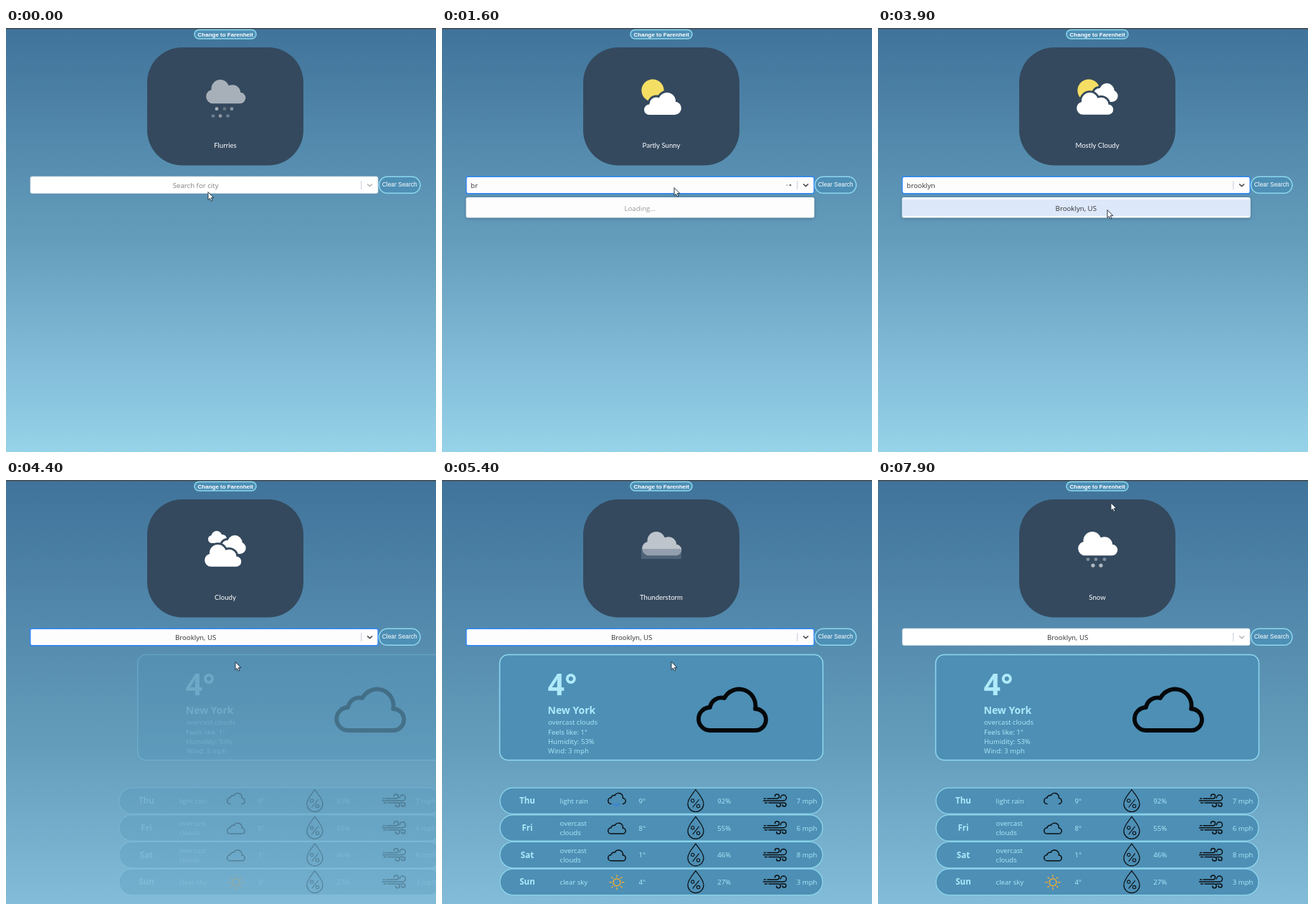
An HTML page with a canvas that plays this animation: 600 by 591 pixels, repeating every 8 s.

```html
<!DOCTYPE html>
<html lang="en">
<head>
<meta charset="utf-8">
<title>Weather search</title>
<style>
html, body { margin: 0; width: 100%; height: 100%; overflow: hidden; background: #659fbc; }
canvas { display: block; width: 600px; height: 591px; }
</style>
</head>
<body>
<canvas id="stage" width="600" height="591"></canvas>
<script>
const ctx = document.getElementById('stage').getContext('2d');
const LOOP = 8000;
const SANS = '"Open Sans", "Noto Sans", sans-serif';
const ARIAL = '"Liberation Sans", Arial, sans-serif';
const LABEL = 'Lato, "Open Sans", sans-serif';
const CARD = '#34495e', PANEL = '#4d8fb5', EDGE = '#8fd8ee', PALE = '#aeeafa';

// Moments of the interaction, in ms
const FOCUS = 980, TYPE = 1420, KEY = 110, FOUND = 3680, PICK = 4300, BLUR = 7150;
const QUERY = 'brooklyn', CITY = 'Brooklyn, US';

const clamp = v => Math.max(0, Math.min(1, v));
const smooth = v => v * v * (3 - 2 * v);

function text(s, x, y, color, font, align = 'left') {
  ctx.font = font;
  ctx.fillStyle = color;
  ctx.textAlign = align;
  ctx.fillText(s, x, y);
}

function box(x, y, w, h, r, fill, edge, line = 1.5) {
  ctx.beginPath();
  ctx.roundRect(x, y, w, h, r);
  ctx.fillStyle = fill;
  ctx.fill();
  if (edge) {
    ctx.strokeStyle = edge;
    ctx.lineWidth = line;
    ctx.stroke();
  }
}

function dot(x, y, r, fill) {
  ctx.beginPath();
  ctx.arc(x, y, r, 0, Math.PI * 2);
  ctx.fillStyle = fill;
  ctx.fill();
}

function stroke(path, color, width) {
  ctx.strokeStyle = color;
  ctx.lineWidth = width;
  ctx.stroke(path);
}

// Runs fn with its own transform and opacity
function group(x, y, scale, alpha, fn) {
  ctx.save();
  ctx.translate(x, y);
  ctx.scale(scale, scale);
  ctx.globalAlpha *= alpha;
  fn();
  ctx.restore();
}

// ---- Summary card ----
const CLOUD = [[289, 95.5, 9.8], [299, 84.5, 12.5], [316, 90.5, 11.2], [326.5, 97.5, 7.8]];
const LOW = [[289.2, 113.8, 7.2], [299, 106, 9.5], [314, 102, 12], [324.7, 111.8, 9.2]];
const BACK = [[309, 92, 8], [319.3, 87.5, 10.4], [326.5, 94.7, 8.2]];
const SMALL = [[287.5, 82.5, 5.5], [294, 78.5, 7.5], [302, 82, 6]];

function cloud(lobes, gap) {
  const first = lobes[0], last = lobes[lobes.length - 1];
  const path = new Path2D();
  for (const [x, y, r] of lobes) {
    path.moveTo(x + r, y);
    path.arc(x, y, r, 0, Math.PI * 2);
  }
  const top = Math.max(first[1], last[1]) - 4;
  path.rect(first[0], top, last[0] - first[0], last[1] + last[2] - top);
  if (gap) stroke(path, CARD, 6);
  ctx.fillStyle = '#fff';
  ctx.fill(path);
}

const frontCloud = () =>
  group(277 - 279 * .927, 90 - 72 * .927, .927, 1, () => cloud(CLOUD, true));

function sun(x, y) {
  dot(x, y, 15.6, '#f5de64');
}

function flakes(xs, y, r, alphas) {
  xs.forEach((x, i) => dot(x, y, r, `rgba(255,255,255,${alphas[i]})`));
}

function snowfall(t) {
  const drop = (xs, shift) => {
    const p = (t / 1100 + shift) % 1;
    const a = Math.sin(Math.PI * p) ** 2;
    flakes(xs, 107 + 17 * p, 1.4 + 1.6 * Math.sin(Math.PI * p), xs.map(() => a));
  };
  drop([300, 311], .53);
  drop([293, 304, 316], .03);
}

const scenes = [
  ['Flurries', () => {
    cloud(CLOUD);
    flakes([294, 305, 315], 112.7, 2.4, [1, .4, .75]);
    flakes([289, 299, 309.5], 122.6, 2.4, [.5, .8, .5]);
  }],
  ['Sunny', () => sun(306, 95.5)],
  ['Partly Sunny', () => { sun(294, 87); cloud(LOW, true); }],
  ['Mostly Cloudy', () => { sun(294, 87); cloud(BACK, true); frontCloud(); }],
  ['Cloudy', () => { cloud(SMALL); cloud(BACK, true); frontCloud(); }],
  ['Thunderstorm', (t, a) => {
    cloud(CLOUD);
    if (a < 1) {
      ctx.fillStyle = 'rgba(105,126,147,.75)';
      ctx.fillRect(278, 96, 56, 14);
    }
  }],
  ['Snow', t => { cloud(CLOUD); snowfall(t); }]
];
const SWITCH = 120, SPAN = 1305, FADE = 90;

function summary(t) {
  box(197, 27, 218, 164.5, 49, CARD);
  const i = Math.min(6, Math.max(0, Math.floor((t - SWITCH) / SPAN) + 1));
  const start = SWITCH + (i - 1) * SPAN, end = start + SPAN;
  let alpha = i ? clamp((t - start) / FADE) : 1;
  if (i < 6) alpha *= clamp((end - t) / (i ? FADE : 210));
  const [name, draw] = scenes[i];
  group(0, 0, 1, alpha, () => draw(t, alpha));
  text(name, 306, 166.8, '#fff', '9.6px ' + LABEL, 'center');
}

// ---- Search bar ----
function loadingDots(t) {
  const base = t < TYPE ? t - 370 : t - 1790;
  for (let i = 0; i < 3; i++) {
    const p = (((base - i * 160) / 1000) % 1 + 1) % 1;
    const a = p < .4 ? smooth(p / .4) : p < .8 ? 1 - smooth((p - .4) / .4) : 0;
    dot(476.8 + i * 4.6, 219, 1.35, `rgba(85,85,85,${a})`);
  }
}

function menu(found) {
  ctx.save();
  ctx.shadowColor = 'rgba(0,0,0,.25)';
  ctx.shadowBlur = 4;
  ctx.shadowOffsetY = 1;
  box(33.5, 236, 486, 28.5, 2.5, '#fdfdfe');
  ctx.restore();
  if (found) {
    ctx.fillStyle = '#dde8fa';
    ctx.fillRect(34, 239, 485.5, 23);
    text(CITY, 276.3, 254.6, '#333', '9.7px ' + SANS, 'center');
  } else {
    text('Loading...', 276.3, 254.6, '#999', '9.7px ' + SANS, 'center');
  }
}

function search(t) {
  const focus = t >= FOCUS && t < BLUR;
  const open = t >= FOCUS && t < PICK;
  const found = t >= FOUND;
  const typed = t >= TYPE ? QUERY.slice(0, Math.floor((t - TYPE) / KEY) + 1) : '';
  const font = '9.7px ' + SANS;

  if (focus) box(33.8, 207.2, 485.4, 23.6, 2.5, '#fefdfe', '#2f86f5');
  else box(34, 207, 485, 23.5, 2.5, '#fff', '#d5dde3', .6);

  if (t >= PICK) {
    text(CITY, 264.6, 222.6, '#333', font, 'center');
  } else if (typed) {
    text(typed, 40, 222.6, '#333', font);
  } else {
    text('Search for city', open ? 252 : 264.6, 222.6, '#808080', font, 'center');
  }
  if (open && !found) loadingDots(t);
  if (open && !typed && (t - FOCUS) % 1060 < 530) {
    ctx.fillStyle = '#333';
    ctx.fillRect(40.3, 212.5, 1, 12.5);
  }

  ctx.fillStyle = '#c4cbd8';
  ctx.fillRect(495.3, 213, 1, 12);
  ctx.lineCap = ctx.lineJoin = 'round';
  stroke(new Path2D('M504.6 217.8 l3 2.9 l3 -2.9'), focus ? '#555' : '#bbb', 1.6);

  if (open) menu(found);
  box(520.5, 207.3, 57.5, 23, 11.5, PANEL, EDGE);
  text('Clear Search', 549.2, 221.4, '#fff', '500 8.4px ' + ARIAL, 'center');
}

// ---- Results ----
const outline = 'M374 349 a16 16 0 0 1 0 -32 a16 16 0 0 1 20 -13 a23 23 0 0 1 43 15 a15 15 0 0 1 0 30';
const closedCloud = new Path2D(outline + 'z');
const openCloud = new Path2D(outline);
const dropShape = new Path2D('M0 -15.5 C-4 -9.5 -11 -3 -11 4.5 A11 11 0 0 0 11 4.5 C11 -3 4 -9.5 0 -15.5z');
const percent = new Path2D('M4.5 -1.5 L-4 9 M-2 0 a2.2 2.2 0 1 1 -4.4 0 a2.2 2.2 0 1 1 4.4 0 M5.8 7.5 a2.2 2.2 0 1 1 -4.4 0 a2.2 2.2 0 1 1 4.4 0');
const breeze = new Path2D('M-15 -3 h2 M-10.5 -3 H3 a3 3 0 1 0 -3 -3 M-16 0 H12 a4 4 0 1 0 -4 -4 M-14 3 h3 M-8.5 3 H5 a2.8 2.8 0 1 1 -2.8 2.8 M8 3 h5 a2.5 2.5 0 1 1 -2.5 2.5');

const days = [
  ['Thu', ['light rain'], 9, 92, 7, 'rain'],
  ['Fri', ['overcast', 'clouds'], 8, 55, 6, 'cloud'],
  ['Sat', ['overcast', 'clouds'], 1, 46, 8, 'cloud'],
  ['Sun', ['clear sky'], 4, 27, 3, 'sun']
];

function dayIcon(kind, y, t) {
  if (kind === 'sun') {
    ctx.strokeStyle = '#f0ad32';
    ctx.lineWidth = 1.4;
    ctx.beginPath();
    ctx.arc(244, y, 5, 0, Math.PI * 2);
    for (let i = 0; i < 8; i++) {
      const c = Math.cos(i * Math.PI / 4), s = Math.sin(i * Math.PI / 4);
      ctx.moveTo(244 + 7.7 * c, y + 7.7 * s);
      ctx.lineTo(244 + 10 * c, y + 10 * s);
    }
    ctx.stroke();
    return;
  }
  const rain = kind === 'rain';
  group(244, rain ? y - 4 : y, .26, 1, () => {
    ctx.translate(-405, -319);
    stroke(rain ? openCloud : closedCloud, '#0b0f12', 5.8);
  });
  if (rain && t > 4700 && t < 6400) {
    for (let i = -1; i < 2; i++) dot(243.5 + i * 3, y + 4.5 + (i ? 0 : 1.5), 1.8, '#3c86d2');
  }
}

function dayRow([name, sky, temp, wet, wind, kind], i, t) {
  const y = 447.3 + i * 37.7, base = y + 3.6, font = '9.6px ' + SANS;
  box(81, y - 18.2, 450, 36.3, 18, PANEL, EDGE, 1.2);
  text(name, 119, y + 4, PALE, 'bold 11.6px ' + SANS, 'center');
  sky.forEach((s, n) => text(s, 164.6, base + (n - (sky.length - 1) / 2) * 13.2, PALE, font));
  dayIcon(kind, y + .3, t);
  text(temp + '°', 274.6, base, PALE, font);
  group(354, y - .3, 1, 1, () => {
    stroke(dropShape, '#0b0f12', 1.2);
    stroke(percent, '#0b0f12', 1.1);
  });
  text(wet + '%', 384.3, base, PALE, font);
  group(464.5, y - .3, 1, 1, () => stroke(breeze, '#0b0f12', 1.5));
  text(wind + ' mph', 494.8, base, PALE, font);
}

function results(t) {
  const p = clamp((t - PICK) / 700), e = 1 - (1 - p) * (1 - p);
  ctx.lineCap = ctx.lineJoin = 'round';
  group(141 * (1 - e), 0, 1, e, () => {
    box(80.5, 243.5, 451, 147, 12, PANEL, EDGE);
    text('4°', 147.5, 300, PALE, 'bold 41px ' + SANS);
    text('New York', 147.5, 326.3, PALE, 'bold 14px ' + SANS);
    ['overcast clouds', 'Feels like: 1°', 'Humidity: 53%', 'Wind: 3 mph'].forEach((s, i) =>
      text(s, 148, 341.2 + i * 13.4, PALE, '9.6px ' + SANS));
    stroke(closedCloud, '#05080a', 5.8);
  });
  group(105 * (1 - e), 0, 1, e, () => days.forEach((d, i) => dayRow(d, i, t)));
}

// ---- Pointer ----
const arrow = new Path2D('M0 0 V10.6 L2.4 8.4 L4.2 12.2 L6 11.4 L4.3 7.7 H7.6z');
const stops = [[0, 282, 229], [150, 282, 229], [850, 324, 223], [3620, 324, 223],
  [3840, 320, 254], [6500, 320, 253.5], [7100, 325, 32], [LOOP, 325, 32]];

function pointer(t) {
  const i = stops.findIndex(s => s[0] > t);
  const [t0, x0, y0] = stops[i - 1], [t1, x1, y1] = stops[i];
  const k = smooth((t - t0) / (t1 - t0));
  group(x0 + (x1 - x0) * k, y0 + (y1 - y0) * k, 1, 1, () => {
    ctx.lineJoin = 'round';
    ctx.fillStyle = '#fff';
    ctx.fill(arrow);
    stroke(arrow, '#263440', 1);
  });
}

function page(t) {
  const sky = ctx.createLinearGradient(0, 0, 0, t < PICK ? 591 : 745);
  sky.addColorStop(0, '#40739a');
  sky.addColorStop(.5, '#649dbc');
  sky.addColorStop(.82, '#85bfdb');
  sky.addColorStop(1, '#96d3e8');
  ctx.fillStyle = sky;
  ctx.fillRect(0, 0, 600, 591);
  ctx.fillStyle = '#474b50';
  ctx.fillRect(0, 0, 600, 1.5);
  box(263, 2.5, 86, 12.5, 6.2, PANEL, EDGE);
  text('Change to Farenheit', 306.2, 11.5, '#fff', 'bold 8px ' + ARIAL, 'center');
}

function frame(now) {
  const t = now % LOOP;
  page(t);
  summary(t);
  if (t >= PICK) results(t);
  search(t);
  pointer(t);
  requestAnimationFrame(frame);
}
requestAnimationFrame(frame);
</script>
</body>
</html>
```
